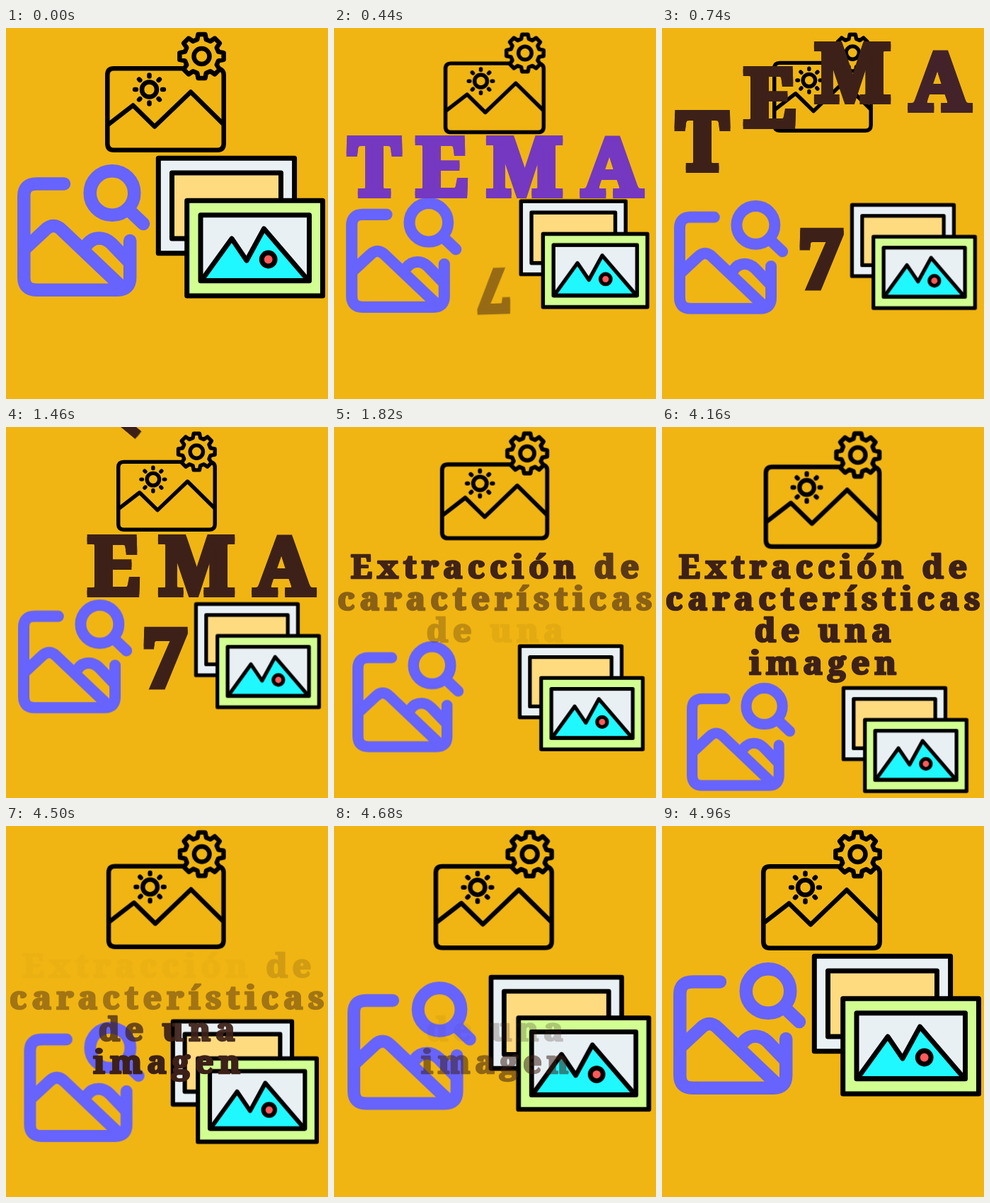
Write an HTML page that moves like this. It is 455 by 525 pixels and loops after 5000 ms.

```html
<!DOCTYPE html>
<html lang="es">
<head>
<meta charset="utf-8">
<title>Tema 7</title>
<style>
  html, body {
    margin: 0;
    width: 100%;
    height: 100%;
    overflow: hidden;
    background: #f0b512;
  }
  #stage {
    position: relative;
    width: 455px;
    height: 525px;
    overflow: hidden;
  }
  svg { position: absolute; left: 0; top: 0; }

  /* Icons travel between three layouts */
  .icon {
    stroke-linecap: round;
    stroke-linejoin: round;
    transform-origin: 0 0;
    animation: travel 5s infinite;
  }
  .line { fill: none; stroke: #000; stroke-width: 6.5; }
  .blue { fill: none; stroke: #6763fd; stroke-width: 18.5; }
  .frames { stroke: #000; stroke-width: 7; }
  .line { --b: translate(39.8px, 1.85px) scale(.83); --c: translate(6.9px, .6px) scale(.976); }
  .blue { --b: translate(3.2px, 77.8px) scale(.861); --c: translate(21.9px, 204.1px) scale(.818); }
  .frames { --b: translate(107.2px, 112.4px) scale(.749); --c: translate(95.2px, 231.4px) scale(.749); }
  @keyframes travel {
    0% { transform: translate(0px, 0px) scale(1); animation-timing-function: ease-in-out; }
    11%, 28.8% { transform: var(--b); animation-timing-function: ease-in-out; }
    44%, 83.2% { transform: var(--c); animation-timing-function: cubic-bezier(.37, 0, .43, 1); }
    99.2%, 100% { transform: translate(0px, 0px) scale(1); }
  }

  /* Side shadows and an outline give the serif face a broad slab weight */
  .big, .title {
    font-family: "Noto Serif", serif;
    font-weight: 900;
    color: #3d2118;
    text-align: center;
    -webkit-text-stroke: var(--edge) currentColor;
    text-shadow: var(--side) 0 currentColor, calc(-1 * var(--side)) 0 currentColor;
  }

  /* Heading letters: drop in, hop while turning brown, fly off */
  .big {
    --edge: 8px;
    --side: 4px;
    position: absolute;
    left: calc(var(--x) - 80px);
    top: 137.5px;
    width: 160px;
    font-size: 112px;
    line-height: 112px;
  }
  .letter {
    transform-origin: 50% 59.5px;
    animation: letter 5s calc(var(--i) * 40ms) linear infinite both;
  }
  @keyframes letter {
    0%, .8% { opacity: 0; color: #7538c0; transform: translate(0px, -130px) rotate(0deg); animation-timing-function: ease-out; }
    4% { opacity: 1; color: #7538c0; transform: translate(0px, 0px) rotate(0deg); }
    10.8% { color: #7538c0; transform: translate(0px, 0px) rotate(0deg); animation-timing-function: ease-out; }
    13% { color: #3d2118; transform: translate(0px, -135px) rotate(0deg); animation-timing-function: ease-in; }
    15.2%, 28.8% { color: #3d2118; transform: translate(0px, 0px) rotate(0deg); }
    29.6% { opacity: 1; transform: translate(258px, -436px) rotate(76deg); }
    29.61%, 100% { opacity: 0; color: #3d2118; transform: translate(258px, -436px) rotate(76deg); }
  }
  .number {
    top: 267.5px;
    transform-origin: 50% 84.5px;
    animation: spin 5s linear infinite;
  }
  @keyframes spin {
    0%, 2.8% { opacity: 0; transform: translate(0px, 0px) rotate(720deg) scale(0); }
    8.8% { opacity: .5; transform: translate(0px, 0px) rotate(180deg) scale(.75); }
    10.8%, 32% { opacity: 1; transform: translate(0px, 0px) rotate(0deg) scale(1); }
    33.2% { opacity: 1; transform: translate(258px, -436px) rotate(76deg) scale(1); }
    33.21%, 100% { opacity: 0; transform: translate(258px, -436px) rotate(76deg) scale(1); }
  }

  /* Title fades word by word */
  .title {
    --edge: 2.5px;
    --side: 1.5px;
    position: absolute;
    left: 0;
    top: 174px;
    width: 462px;
    white-space: nowrap;
    font-size: 46px;
    line-height: 45.2px;
    letter-spacing: 7.2px;
  }
  .title span { animation: word 5s calc(var(--i) * 68ms) ease-in-out infinite both; }
  @keyframes word {
    0%, 29.6% { opacity: 0; }
    37.2%, 83.2% { opacity: 1; }
    90.8%, 100% { opacity: 0; }
  }
</style>
</head>
<body>
<div id="stage">
  <svg width="455" height="525" viewBox="0 0 455 525">
    <g class="icon line">
      <path d="M249 57.3H152.5Q143.3 57.3 143.3 66.5V163.5Q143.3 172.8 152.5 172.8H298.5Q307.7 172.8 307.7 163.5V66Q307.7 61 303.5 58.5"/>
      <path d="M144 137L179.5 109.5L210 139.5L261 90.5L307 136"/>
      <circle cx="202.5" cy="87" r="10.5"/>
      <path id="rays"/>
      <path id="gear"/>
      <circle cx="276.5" cy="40" r="11"/>
    </g>

    <g class="icon blue">
      <path d="M82 220.5H43Q25.3 220.5 25.3 238V353Q25.3 370.7 43 370.7H157.5Q175.2 370.7 175.2 353V301"/>
      <path d="M26 313L55 286Q67 274 79 286L163 366"/>
      <path d="M114 307Q121 297.5 132 297.5Q141 297.5 149 305L174 331"/>
      <circle cx="150" cy="233.5" r="31.3"/>
      <path d="M173 257L194 277"/>
    </g>

    <g class="icon frames">
      <rect x="215.3" y="184.3" width="192.3" height="134.4" fill="#e9f1f5"/>
      <rect x="234.5" y="205" width="154" height="93" fill="#ffdb80"/>
      <rect x="255.7" y="244.3" width="191.8" height="134.7" fill="#d2ff92"/>
      <rect x="275" y="264.8" width="153.5" height="93" fill="#e9f0f4"/>
      <path d="M276 357.5L319 298L340 329L364.5 284L427.5 357.5Z" fill="#1ff8ff"/>
      <circle cx="370.7" cy="327.5" r="9.4" fill="#ff5a5a"/>
    </g>
  </svg>

  <div class="big letter" style="--i:0; --x:56.5px">T</div>
  <div class="big letter" style="--i:1; --x:152px">E</div>
  <div class="big letter" style="--i:2; --x:269px">M</div>
  <div class="big letter" style="--i:3; --x:393px">A</div>
  <div class="big number" style="--x:225px">7</div>

  <div class="title">
    <span style="--i:0">Extracción</span> <span style="--i:1">de</span><br>
    <span style="--i:2">características</span><br>
    <span style="--i:3">de</span> <span style="--i:4">una</span><br>
    <span style="--i:5">imagen</span>
  </div>
</div>
<script>
  // Point at an angle and radius around a centre
  const around = (cx, cy) => (deg, r) => {
    const a = deg * Math.PI / 180;
    return `${cx + r * Math.cos(a)} ${cy + r * Math.sin(a)}`;
  };
  const sun = around(202.5, 87);
  const hub = around(276.5, 40);
  const rays = [];
  const teeth = [];
  for (let deg = 0; deg < 360; deg += 45) {
    rays.push(`M${sun(deg, 18.6)}L${sun(deg, 20.4)}`);
    teeth.push(
      hub(deg - 15, 24.5), hub(deg - 9, 31.5),
      hub(deg + 9, 31.5), hub(deg + 15, 24.5)
    );
  }
  document.getElementById("rays").setAttribute("d", rays.join(""));
  document.getElementById("gear").setAttribute("d", `M${teeth.join("L")}Z`);
</script>
</body>
</html>
```
